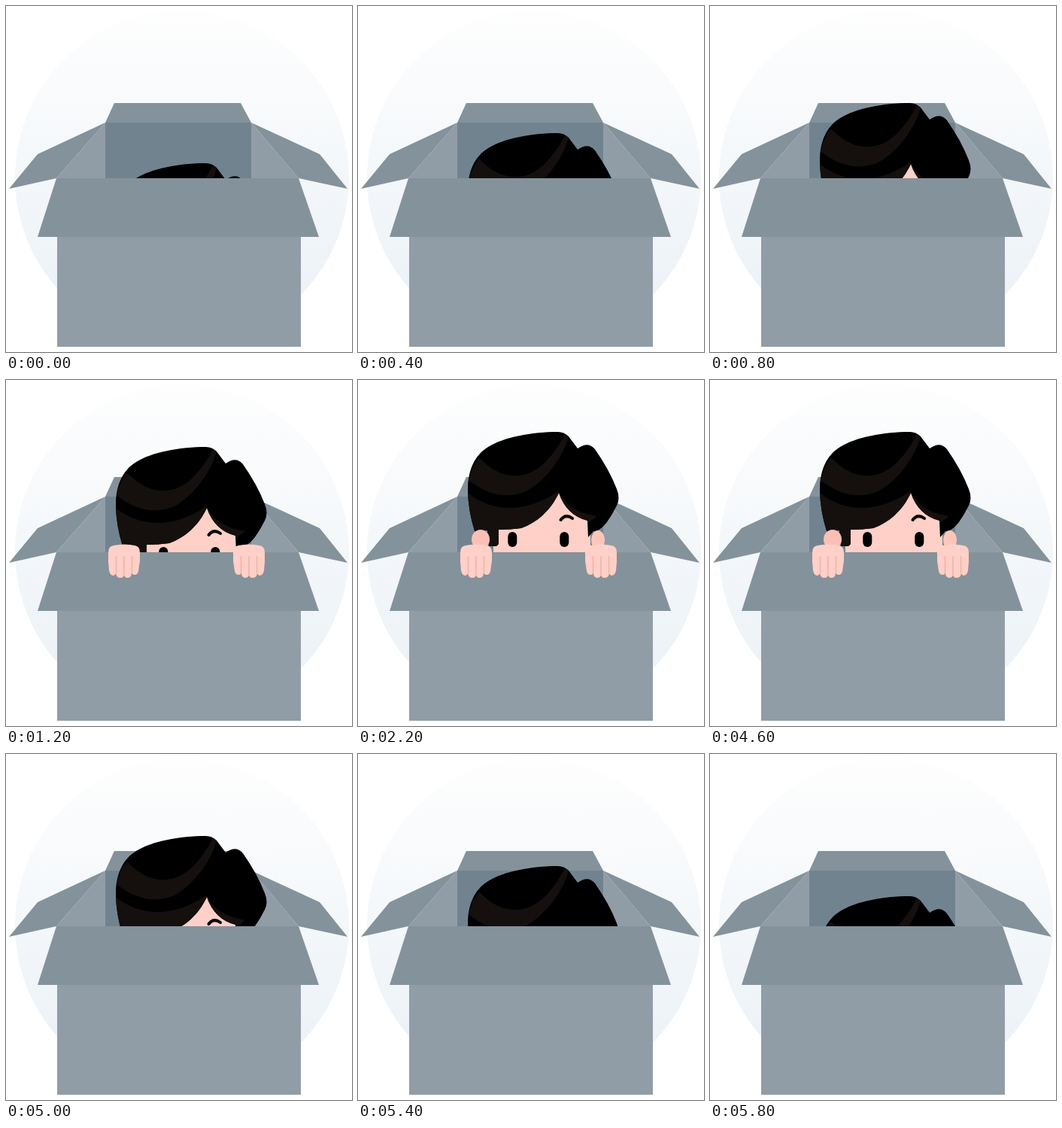
Write an HTML page that moves like this. It is 460 px wide and 460 px high and loops after 6000 ms.

```html
<!DOCTYPE html>
<html lang="en">
<head>
<meta charset="utf-8">
<title>Peeking out of a box</title>
<style>
  html, body { margin: 0; width: 100%; height: 100%; overflow: hidden; background: #fff; }
  svg { display: block; width: 100%; height: 100%; }
  .flap { fill: #84929b; }
  .side { fill: #919da6; }
  .skin { fill: #ffd0c7; }
  .shine { fill: #15100d; }
</style>
</head>
<body>
<svg viewBox="0 0 460 460">
  <defs>
    <linearGradient id="sky" x2="0" y2="1">
      <stop stop-color="#fefefe"/>
      <stop offset="1" stop-color="#e9f0f6"/>
    </linearGradient>
    <g id="hand">
      <path class="skin" d="M136 229Q136 221 143 220Q157 217 171 220Q178 221 178 229V240L176 254Q175 259 171 259Q168 259 167 256Q167 263 162 263Q157 263 157 258Q157 263 152 263Q147 263 146 257Q145 260 142 260Q138 259 137 253L136 242Z"/>
      <path d="M146.500 235V256M157 235V258M167.500 235V256" fill="none" stroke="#eeb3a9" stroke-width="1.500" stroke-linecap="round"/>
    </g>
  </defs>

  <circle cx="234" cy="228" r="222" fill="url(#sky)"/>

  <path fill="#728390" d="M132 155H326V229H132Z"/>
  <path class="flap" d="M144 129H312L326 155H132ZM132 155L42 197L4 243L67 229ZM326 155L417 197L454 243L389 229Z"/>
  <path class="side" d="M132 155V229H67ZM326 155V229H389Z"/>

  <g id="head">
    <path class="skin" d="M180 229V190L267 145L309 180V229Z"/>
    <path d="M155 201Q146 172 146 146C146 120 155 100 173 89C194 76 230 69 266 69Q274 69 280 75L292 91Q306 81 315 92Q334 119 344 145Q349 157 344 167C336 182 326 201 313 201L306 209L305 187C287 183 274 170 267 150C256 174 237 190 217 197Q203 199 187 199V216Q187 221 181 221H174L172 200Z"/>
    <path class="shine" d="M161 103C190 135 225 133 248 110Q264 94 275 72L280 75C274 99 252 132 224 148C198 159 169 152 147 133Q151 115 161 103Z"/>
    <path class="shine" d="M146 150C180 178 226 176 266 148L267 150C256 174 237 190 217 197Q203 199 187 199V216Q187 221 181 221H174L172 200H155Q147 174 146 150Z"/>
    <path class="shine" d="M267 150Q282 176 318 181L306 190V187Q277 180 267 150Z"/>
    <ellipse cx="163" cy="212" rx="12" ry="13" fill="#fbc0b5"/>
    <ellipse cx="319" cy="213" rx="9" ry="13" fill="#fec6bb"/>
    <path d="M269.500 186Q276 177.500 285 184" fill="none" stroke="#000" stroke-width="4" stroke-linecap="round"/>
    <g id="eyes">
      <rect x="203.300" y="202" width="12" height="20" rx="6"/>
      <rect x="272.300" y="202" width="12" height="20" rx="6"/>
    </g>
  </g>

  <path class="side" d="M68 306H392V453H68Z"/>
  <path class="flap" d="M67 229H389L416 307H42Z"/>
  <g id="hands">
    <use href="#hand"/>
    <use href="#hand" transform="translate(480 0) scale(-1 1)"/>
  </g>
</svg>
<script>
  const STEP_MS = 200, STEPS = 30;
  const [head, eyes, hands] = ["head", "eyes", "hands"].map(id => document.getElementById(id));

  // A glance darts out in two steps, then drifts back.
  const GLANCE = [4, 8, 6, 4, 2];
  const glance = step => GLANCE[step] || 0;

  function draw(now) {
    const step = Math.floor(now / STEP_MS) % STEPS;
    const drop = Math.max(0, 140 - 20 * step, 20 * (step - 23));
    const look = glance(step - 18) - glance(step - 8);
    head.setAttribute("transform", `translate(0 ${drop})`);
    eyes.setAttribute("transform", `translate(${look} 0)`);
    hands.setAttribute("visibility", drop <= 20 ? "visible" : "hidden");
  }

  const start = performance.now();
  function tick() {
    draw(performance.now() - start);
    requestAnimationFrame(tick);
  }
  tick();
</script>
</body>
</html>
```
